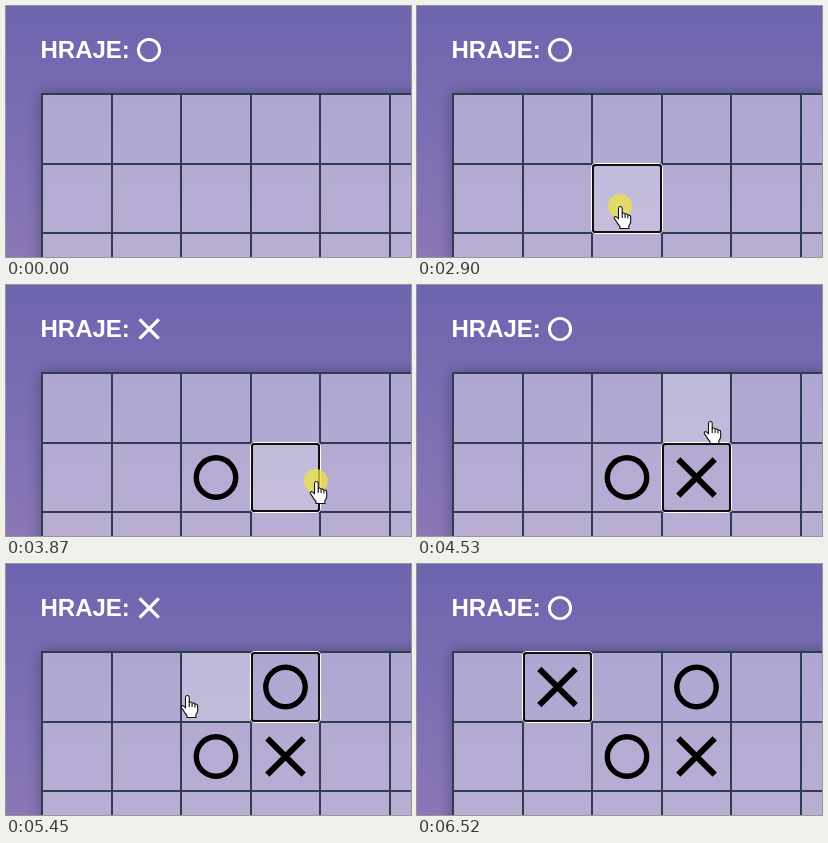
An HTML page with a canvas for the animation above (7010 ms loop, 405 by 251 pixels).

```html
<!DOCTYPE html>
<html lang="cs">
<head>
<meta charset="utf-8">
<title>Piškvorky</title>
<style>
  html, body { margin: 0; width: 100%; height: 100%; overflow: hidden; }
  canvas { position: absolute; left: 0; top: 0; display: block; }
  h1 {
    position: absolute; left: 34.5px; top: 30px; margin: 0;
    font: bold 24px/28px "Liberation Sans", Arial, sans-serif;
    color: #fff; white-space: nowrap;
  }
</style>
</head>
<body>
<canvas id="stage" width="405" height="251"></canvas>
<h1>HRAJE:</h1>
<script>
const W = 405, H = 251, LOOP = 7010;
const ctx = document.getElementById('stage').getContext('2d');

// Left/top pixel of each 2px grid line
const colX = [35, 105, 174, 244, 313, 383, 453];
const rowY = [87, 157, 226, 296];

// Each turn: cell, press and release time, symbol
const turns = [
  { c: 2, r: 1, down: 2900, up: 3000, mark: 'O' },
  { c: 3, r: 1, down: 3870, up: 3920, mark: 'X' },
  { c: 3, r: 0, down: 4810, up: 4900, mark: 'O' },
  { c: 1, r: 0, down: 5780, up: 5860, mark: 'X' }
];

// Pointer moves: start, end, steps, from, to
const moves = [
  [2390, 2540, 4, [192, 259], [203, 200]],
  [3000, 3000, 1, [203, 200], [208, 200]],
  [3280, 3560, 7, [208, 200], [310, 196]],
  [3920, 3920, 1, [310, 196], [310, 192]],
  [4250, 4530, 7, [310, 192], [293, 136]],
  [5090, 5630, 13, [293, 136], [148, 129.5]],
  [6320, 6520, 5, [148, 129.5], [200, 256]]
];

const ease = p => p * p * (3 - 2 * p);

function pointerAt(t) {
  if (t < 2390 || t >= 6520) return null;
  const [start, end, n, a, b] = moves.filter(m => t >= m[0]).pop();
  const k = t >= end ? n - 1 : Math.floor((t - start) / (end - start) * (n - 1) + 1e-6);
  const p = ease((k + 1) / n);
  return a.map((v, i) => Math.round(v + (b[i] - v) * p));
}

function cellBox(c, r) {
  const x = colX[c] + 2, y = rowY[r] + 2;
  return [x, y, colX[c + 1] - x, rowY[r + 1] - y];
}

function cellAt(x, y) {
  for (let r = 0; r < 3; r++) for (let c = 0; c < 6; c++) {
    if (x >= colX[c] + 1 && x < colX[c + 1] + 1 && y >= rowY[r] + 1 && y < rowY[r + 1] + 1) return { c, r };
  }
  return null;
}

function drawMark(kind, x, y, size, width, color) {
  ctx.strokeStyle = color;
  ctx.lineWidth = width;
  ctx.lineCap = 'butt';
  ctx.beginPath();
  if (kind === 'O') {
    ctx.arc(x, y, size, 0, Math.PI * 2);
  } else {
    ctx.moveTo(x - size, y - size);
    ctx.lineTo(x + size, y + size);
    ctx.moveTo(x + size, y - size);
    ctx.lineTo(x - size, y + size);
  }
  ctx.stroke();
}

function drawBackground() {
  const g = ctx.createLinearGradient(0, 0, 0, H);
  g.addColorStop(0, '#6d65af');
  g.addColorStop(1, '#8b77b7');
  ctx.fillStyle = g;
  ctx.fillRect(0, 0, W, H);

  // Board shadow, outside the board only
  ctx.save();
  ctx.beginPath();
  ctx.rect(0, 0, W, H);
  ctx.rect(35, 87, 500, 500);
  ctx.clip('evenodd');
  ctx.shadowColor = 'rgba(0,0,0,.3)';
  ctx.shadowBlur = 14;
  ctx.fillStyle = '#000';
  ctx.fillRect(35, 87, 500, 500);
  ctx.restore();
}

function drawGrid(hover) {
  ctx.fillStyle = 'rgba(255,255,255,.4)';
  ctx.fillRect(35, 87, W, H);
  if (hover) {
    ctx.fillStyle = 'rgba(255,255,255,.2)';
    ctx.fillRect(...cellBox(hover.c, hover.r));
  }
  ctx.fillStyle = '#2c3e50';
  colX.forEach(x => ctx.fillRect(x, 87, 2, H));
  rowY.forEach(y => ctx.fillRect(35, y, W, 2));
}

function drawFocus(c, r) {
  const [x, y, w, h] = cellBox(c, r);
  const ring = (grow, radius, width, color) => {
    ctx.beginPath();
    ctx.roundRect(x - grow, y - grow, w + 2 * grow, h + 2 * grow, radius);
    ctx.lineWidth = width;
    ctx.strokeStyle = color;
    ctx.stroke();
  };
  ring(1.5, 3.5, 1, '#fff');
  ring(0, 2.5, 2, '#101010');
}

const hand = new Path2D(
  'M-2 2 Q-2 0 -.2 0 Q1.7 0 1.7 2 V7 Q3 5.8 4.6 7.6 Q6.2 6.8 7.4 8.6 ' +
  'Q10.2 8.2 10.2 11 V15 Q10.2 17 8.4 19 V22 H-.6 V20 Q-3 17.5 -4.4 14.6 ' +
  'L-6.2 12 Q-6.4 9.8 -4.4 10.2 Q-3 10.8 -2 12.4 Z');
const knuckles = new Path2D('M1.7 7 V11.5 M4.6 8 V11.5 M7.4 9 V12');

function drawPointer(x, y, pressed) {
  if (pressed) {
    ctx.fillStyle = 'rgba(238,230,60,.72)';
    ctx.beginPath();
    ctx.arc(x, y, 12, 0, Math.PI * 2);
    ctx.fill();
  }
  ctx.save();
  ctx.translate(x + .5, y + .5);
  ctx.lineJoin = 'round';
  ctx.lineWidth = 1.1;
  ctx.strokeStyle = '#111';
  ctx.fillStyle = '#fff';
  ctx.fill(hand);
  ctx.stroke(hand);
  ctx.stroke(knuckles);
  ctx.restore();
}

function draw(t) {
  const placed = turns.filter(m => t >= m.up);
  const focus = turns.filter(m => t >= m.down).pop();
  const pressed = turns.some(m => t >= m.down && t < m.up);
  const pointer = pointerAt(t);
  let hover = pointer && cellAt(...pointer);
  if (hover && placed.some(m => m.c === hover.c && m.r === hover.r)) hover = null;

  drawBackground();
  drawGrid(hover);
  if (focus) drawFocus(focus.c, focus.r);

  for (const { c, r, mark } of placed) {
    const [x, y, w, h] = cellBox(c, r);
    const size = mark === 'O' ? 19.7 : 18.2;
    drawMark(mark, x + w / 2, y + h / 2, size, mark === 'O' ? 5.4 : 6, '#000');
  }

  if (placed.length % 2) drawMark('X', 143.2, 44, 9.6, 3.2, '#fff');
  else drawMark('O', 143, 44, 10.6, 2.9, '#fff');

  if (pointer) drawPointer(...pointer, pressed);
}

const began = performance.now();
function tick() {
  draw((performance.now() - began) % LOOP);
  requestAnimationFrame(tick);
}
tick();
</script>
</body>
</html>
```
